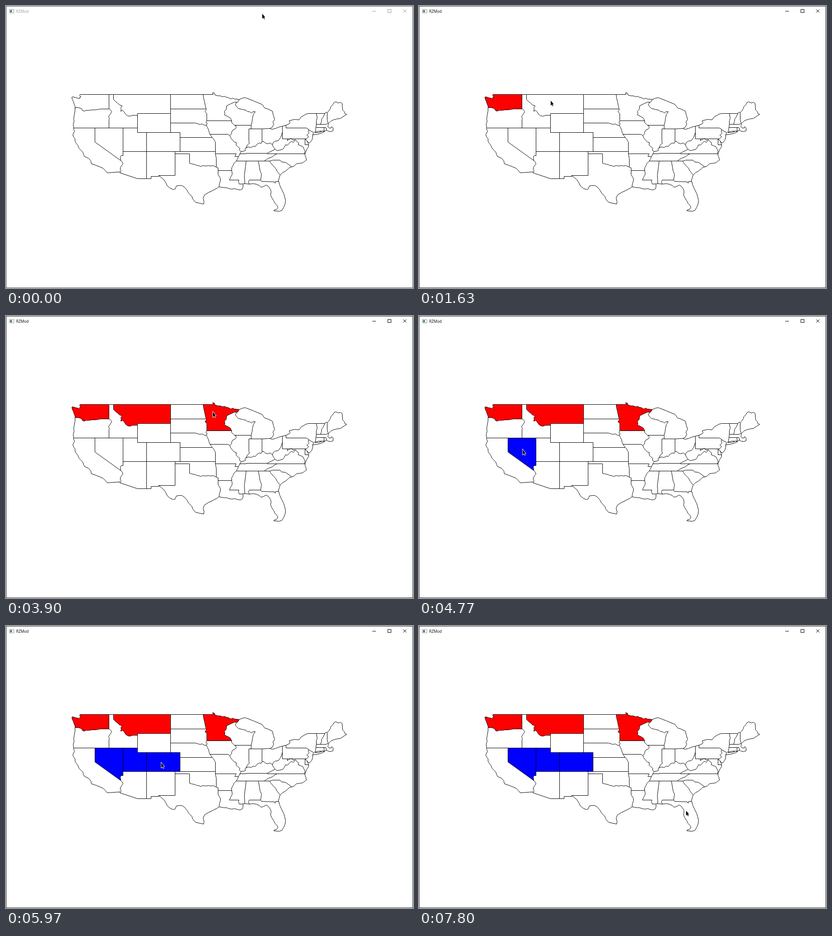
Write an HTML page that moves like this. It is 899 by 623 pixels and loops after 8000 ms.

```html
<!DOCTYPE html>
<html lang="en">
<head>
<meta charset="utf-8">
<title>Map colouring</title>
<style>
  html, body { margin: 0; width: 100%; height: 100%; overflow: hidden; background: #fff; }
  svg { display: block; }
  #map path { fill: none; stroke: #000; stroke-width: 1; stroke-linejoin: round; }
  #bar { color: #999; }
  #bar.active { color: #000; }
  #bar path, #bar rect.box { fill: none; stroke: currentColor; }
  #bar text { font: 8.4px "Open Sans", "Noto Sans", sans-serif; fill: currentColor; }
</style>
</head>
<body>
<svg width="899" height="623" viewBox="0 0 899 623">
  <rect id="frame" x=".5" y=".5" width="898" height="622" fill="#fff" stroke="#555"/>
  <g id="bar">
    <rect x="7.5" y="7.5" width="10" height="8" fill="#eef1f1" stroke="#a3a9a9"/>
    <rect x="9" y="9" width="4" height="5" fill="#4f7a74"/>
    <text x="22.5" y="15">RZMod</text>
    <path d="M809 11.5h8M877.5 7.5l7 7M884.5 7.5l-7 7"/>
    <rect class="box" x="843.5" y="7.5" width="7" height="7"/>
  </g>

  <g id="map" transform="translate(.5 -.5)">
    <!-- states that can be coloured -->
    <path id="wa" d="M163 196H227V228L208 228 203 229 196 230 190 230 183 231 176 231 172 233 168 231 167 228 163 226 159 225 152 225 152 222 150 217 148 211 146 207 145 202 147 201 153 203 158 204 161 205 163 204 162 202 165 201 162 198Z"/>
    <path id="mt" d="M237 196H363V238H290L290 242 286 242 279 242 273 244 268 243 264 240 260 234 257 231 253 233 254 228 253 226 256 221 250 219 246 215 242 212 237 207Z"/>
    <path id="mn" d="M435 196H457L456 192 460 193 461 197 468 199 473 199 478 201 482 200 486 202 491 203 496 206 500 204 504 206 515 207 511 213 504 213 495 217 487 221 486 229 482 233 483 238 482 241 490 245 495 248 498 254H443L443 238 439 234 442 230 440 222 438 212 436 204Z"/>
    <path id="nv" d="M196 270H258V331L254 331 252 334 253 342 196 301Z"/>
    <path id="ut" d="M258 270H290V280H310V322H258Z"/>
    <path id="co" d="M310 280H384V322H310Z"/>
    <path id="fl" d="M537 385H562L564 388 592 389 594 392 595 388 602 388 604 396 608 405 613 415 615 422 617 430 616 438 613 445 609 452 603 454 591 453 592 451 597 450 600 446 599 442 594 437 591 431 586 423 584 418 585 411 584 406 579 399 574 396 569 399 563 401 559 397 552 394 545 393 537 394 535 389Z"/>

    <!-- north-west and mountains -->
    <path d="M227 196H237M152 225L152 232 150 243 149 250 150 255 148 262 149 270H290M227 228L229 229 232 232 233 234 230 239 226 245 228 249 227 251V270"/>
    <path d="M290 242V280H363V238M363 196H435M363 228H441M363 280H384"/>
    <!-- west coast and south-west -->
    <path d="M149 270L149 273 151 277 147 285 149 290 152 294 152 299 154 303 158 308 161 315 165 319 169 323 171 329 173 333 182 337 187 343 188 349 197 352 207 356 214 359 219 364 223 369 252 367"/>
    <path d="M253 342L256 345 258 349 255 353 252 358 252 362 254 365 251 369 290 382H320V377H337V375H373V322M258 331V322M310 322V382M384 322H373"/>
    <!-- plains -->
    <path d="M363 238V280M363 259H418L424 261 428 262 433 261 438 264 442 264M443 254L441 258 444 260 442 264 444 268 447 274 448 279 450 284 453 288 455 291 458 294 460 298 462 301V327"/>
    <path d="M384 280V291H455M384 322H462M450 284H490L494 287M373 327H405V348L409 349 413 350 418 351 421 353 425 353 429 355 435 353 441 354 447 353 451 354 457 353 463 356 468 358V364"/>
    <path d="M462 327L464 337 464 356M462 327H508L505 333H513M468 364H498"/>
    <!-- gulf -->
    <path d="M337 375L342 379 348 384 352 390 356 398 362 403 369 406 373 405 376 398 382 397 388 397 394 401 399 407 403 414 410 421 412 427 418 434 426 436 436 438 437 433 435 425 438 418 446 413 456 408 466 403 470 400"/>
    <path d="M468 364L468 373 473 381 473 387 471 393 470 400 476 401 482 402 487 402 492 404 498 405 505 404 511 406 517 407 522 404 523 400 523 394"/>
    <path d="M514 385L513 389 515 394 528 393 537 394M498 364L499 369 499 373 496 378 493 385H514"/>
    <path d="M530 343L526 375 527 393M557 343L561 366 564 372 563 378 562 385"/>
    <!-- great river -->
    <path d="M498 254L498 258 502 262 504 264 507 265 508 269 506 272 500 275 498 279 498 282 494 287 496 292 500 297 504 301 508 302 508 308 511 311 516 315 515 319 519 322 517 326 513 333 511 338 508 343 503 348 501 353 498 358 498 364"/>
    <!-- lakes -->
    <path d="M509 213L506 219 509 223 513 227 522 229 530 231 533 234 538 234 541 237 545 234 550 234 546 240 544 248 543 256 541 264V272M504 264H541"/>
    <path d="M515 207L522 204 528 203 546 210 565 218 571 226 578 228 588 233 590 242 593 251 589 257 591 262 587 269 582 271 565 272H536V299L537 304 533 307 531 311 530 315"/>
    <!-- ohio valley -->
    <path d="M519 322L525 321 529 319 527 317 530 313 535 312 541 313 546 310 550 311 554 306 559 303 563 304 565 300 569 300 572 303 577 305 583 303 588 307 590 302 594 299 601 298 606 291 609 283 610 279M565 272V300"/>
    <path d="M582 271L587 273 595 271 602 268 610 266V294H663M610 266L618 264V270H663L668 273 667 278 669 281 664 286 668 289 663 294"/>
    <path d="M515 327H530V326H576L586 321 594 317 590 312 588 307M508 343H582M570 343L574 340 579 337 587 334 594 329 598 327M576 327H660"/>
    <path d="M594 317L598 320 604 319 611 317 614 313 617 307 621 308 625 304 630 299 634 302 638 297"/>
    <path d="M621 294V298L625 295 630 293 634 297 639 296 642 300 646 303 645 307 650 309 655 311 658 317 660 321 659 327M660 294V307H668L668 311 664 317 661 324 660 327"/>
    <!-- south-east coast -->
    <path d="M582 343L584 347 590 354 595 359 598 365 601 369 605 374 603 380 601 388M582 343L589 341 605 341 608 345 617 346 631 356"/>
    <path d="M605 374L610 369 617 365 622 361 626 357 631 356 636 354 641 349 648 348 655 347 660 343 663 341 662 335 660 331 660 327"/>
    <!-- north-east -->
    <path d="M618 264L626 260 627 258 625 254 637 251 647 252 651 246 661 240 667 238H704L706 235 709 236M685 238L687 248 685 254 685 262 684 270 683 277 681 279"/>
    <path d="M668 274L679 280 677 285 687 284 700 280 703 278 698 277 690 280 681 280M677 285L677 291 675 297 670 303 667 302 664 298 661 296 663 294M664 298L666 302 668 307"/>
    <path d="M704 238L700 246 697 250 696 257 694 262M709 236L709 252 711 259M685 262H706L711 260 713 259"/>
    <path d="M709 236L712 233 716 227 717 223 721 219 724 214 728 212 734 215 738 213 742 216 743 230 747 234 748 238 752 240 747 243 738 249 730 250 723 252 718 254 713 259"/>
    <path d="M711 260L712 263 710 266 713 270 718 270 719 267 722 270 722 276 717 278 711 277 708 275 702 277 690 277 682 279M684 269H706L708 275M702 269V277"/>
  </g>

  <path id="cursor" d="M0 0V11L2.5 8.8 4.1 12.3 5.6 11.7 4 8.3 6.5 8Z"
        fill="#000" stroke="#fff" stroke-width="1.6" paint-order="stroke"/>
</svg>

<script>
const LOOP = 8000, FOCUS = 1200;
const RED = "#f00", BLUE = "#00f";
const byId = id => document.getElementById(id);

// state, colour, clicked at, cleared at
const clicks = [
  ["wa", RED, 1200], ["mt", RED, 2000], ["mn", RED, 2800],
  ["nv", BLUE, 4770], ["ut", BLUE, 5430], ["co", BLUE, 5970],
  ["fl", BLUE, 7000, 7800]
];

// start, end, x, y
const start = [566, 17];
const moves = [
  [230, 870, 182, 207], [1230, 1630, 291, 209], [2040, 2600, 457, 212],
  [3930, 4330, 221, 322], [4330, 4530, 229, 295], [4830, 5100, 292, 300],
  [5460, 5670, 343, 302], [6170, 6800, 590, 408]
];

// quick start, soft landing
function ease(p) {
  const q = Math.pow(p, 0.6);
  return q * q * (3 - 2 * q);
}

function cursorAt(t) {
  let [x, y] = start;
  for (const [from, to, endX, endY] of moves) {
    if (t <= from) break;
    const k = ease(Math.min(1, (t - from) / (to - from)));
    x += (endX - x) * k;
    y += (endY - y) * k;
  }
  return [x, y];
}

function draw(now) {
  const t = now % LOOP, active = t >= FOCUS;
  byId("bar").classList.toggle("active", active);
  byId("frame").setAttribute("stroke", active ? "#333" : "#555");
  for (const [id, colour, on, off = LOOP] of clicks)
    byId(id).style.fill = t >= on && t < off ? colour : "none";
  byId("cursor").setAttribute("transform", `translate(${cursorAt(t)})`);
  requestAnimationFrame(draw);
}
requestAnimationFrame(draw);
</script>
</body>
</html>
```
